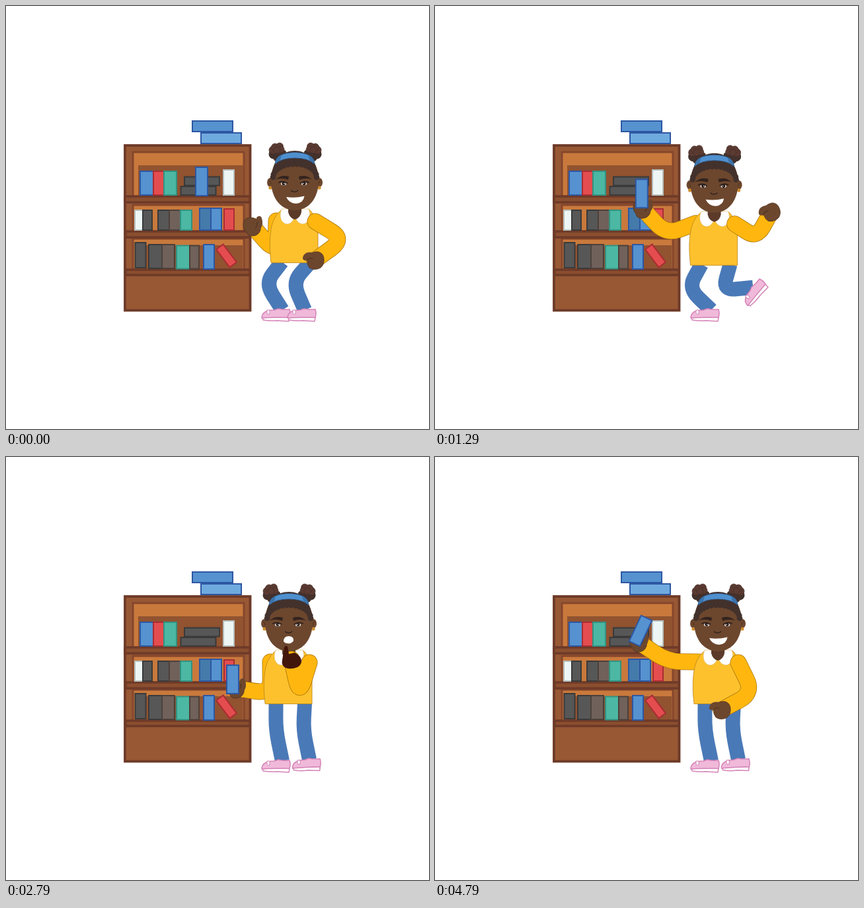
An HTML page that plays this animation: 640x640 px, repeating every 4.93 s.

```html
<!DOCTYPE html>
<html lang="en">
<head>
<meta charset="utf-8">
<title>Girl at the bookshelf</title>
<style>
  html, body { margin: 0; width: 100%; height: 100%; overflow: hidden; background: #fff; }
  svg { display: block; width: 100vw; height: 100vh; }
  .frame { fill: #985834; stroke: #6e3a28; stroke-width: 3.8; }
  .board { fill: #8b4f2f; stroke: #6e3a28; stroke-width: 3.5; }
  .niche { fill: #c9793c; stroke: #85462c; stroke-width: 3; }
  .back { fill: #915330; }
  .limb { fill: none; stroke-linejoin: round; }
  .leg { stroke: #4a79b7; stroke-width: 22; }
  .sleeve { stroke: #ffb70f; stroke-width: 23.4; stroke-linecap: round; }
  .seam { stroke: #a9740c; stroke-width: 25; stroke-linecap: round; }
  .skin { fill: #6c472e; }
  .hand { fill: #6c472e; stroke: #533420; stroke-width: .8; }
  .thumb { fill: none; stroke: #6c472e; stroke-width: 8; stroke-linecap: round; stroke-linejoin: round; }
  .crease { fill: none; stroke: #4a2e1d; stroke-width: 1; stroke-linecap: round; }
  .hair { fill: #43312c; }
  .curl { fill: #5a3a31; stroke: #49302a; stroke-width: .7; }
  .ink { fill: none; stroke: #2f211d; stroke-linecap: round; }
</style>
</head>
<body>
<svg viewBox="0 0 640 640" xmlns="http://www.w3.org/2000/svg">
  <defs>
    <g id="shoe" stroke="#d583b6" stroke-width="1.5" stroke-linejoin="round">
      <path fill="#fff" d="M-30 11L-29 15Q-18 17 -8 16L10 17L11 11Z"/>
      <path fill="#f0b9da" d="M-31 12C-31 3 -23 0 -12 0L-6 -2Q3 0 11 -1Q13 5 11 11Q-12 11 -31 12Z"/>
      <path fill="#fff" stroke-width="1" d="M-23 0h4v6q-3 1 -4 -1z"/>
    </g>
    <g id="bun">
      <g class="hair">
        <circle cx="396" cy="209" r="7.5"/><circle cx="401" cy="214" r="6"/>
        <circle cx="407" cy="212" r="7"/><circle cx="411" cy="207" r="4"/>
        <circle cx="410" cy="215" r="4"/>
      </g>
      <g class="curl">
        <circle cx="395" cy="203" r="6"/><circle cx="398" cy="198.500" r="5.500"/>
        <circle cx="405" cy="197.500" r="5.500"/><circle cx="407" cy="202" r="5"/>
        <circle cx="401" cy="203" r="5"/>
      </g>
    </g>
    <g id="side">
      <ellipse class="skin" cx="391" cy="252" rx="5" ry="7"/>
      <path class="crease" d="M389 249q3 1 3 6"/>
      <circle cx="391" cy="260" r="2.6" fill="#cf8f2f"/>
    </g>
    <g id="eye">
      <path d="M399 247.500Q407 239.500 419 243L418 248Q409 244.500 399 247.500Z" fill="#33231e"/>
      <ellipse cx="411" cy="254" rx="4" ry="2.2" fill="#fff"/>
      <circle cx="411" cy="253.500" r="2.6" fill="#241814"/>
      <path class="ink" stroke-width="1.8" d="M404 252Q410 249 416.500 253"/>
      <circle cx="412" cy="253.500" r=".8" fill="#fff"/>
    </g>
  </defs>

  <g id="shelf">
    <rect class="frame" x="180" y="211" width="189.500" height="249.500"/>
    <rect class="niche" x="192" y="221" width="168" height="68"/>
    <rect class="back" x="200" y="241" width="159" height="46"/>
    <rect class="niche" x="192" y="301" width="168" height="40"/>
    <rect class="niche" x="192" y="352" width="168" height="47"/>
    <rect class="back" x="200" y="362" width="158" height="36"/>
    <rect class="board" x="180" y="288" width="189" height="9"/>
    <rect class="board" x="181" y="341" width="188" height="9"/>
    <rect class="board" x="181" y="399" width="188" height="8"/>
  </g>
  <g id="books"></g>

  <path id="leftLeg" class="limb leg"/>
  <path id="rightLeg" class="limb leg"/>
  <use href="#shoe" transform="translate(418 460)"/>
  <g id="rightFoot"><use href="#shoe" x="5"/></g>

  <path id="leftSeam" class="limb seam"/>
  <path id="leftSleeve" class="limb sleeve"/>
  <g id="leftHand">
    <path class="hand" d="M-14 -4Q-13 -12 -4 -13Q5 -13 10 -6Q13 0 12 6Q9 15 -1 15Q-8 15 -9 9Q-15 4 -14 -4Z"/>
    <path class="thumb" d="M8 3Q13 -3 10 -11"/>
    <path class="crease" d="M4 3Q8 0 7 -6"/>
  </g>
  <g id="heldBook"></g>

  <g id="body">
    <path fill="#fdc12d" stroke="#b9821a" stroke-width=".8"
      d="M392 373.500Q389 350 391 330Q393 305 407 294L450 293Q461 302 463 330L463 373.500Z"/>
    <path fill="#fff" stroke="#d9b25d" stroke-width=".6"
      d="M408 292C403 304 408 315 417 315Q425 314 428 303Q431 314 440 315C450 314 453 302 449 292Z"/>
    <path fill="#5b3a29" d="M418 286h20v11q-2 9 -10 11q-8 -2 -10 -11z"/>
    <use href="#bun"/>
    <use href="#bun" transform="matrix(-1 0 0 1 857 0)"/>
    <use href="#side"/>
    <use href="#side" transform="matrix(-1 0 0 1 856 0)"/>
    <path class="skin" d="M392 249C392 220 408 208 428 208S464 220 464 249C464 277 448 294 428 294S392 277 392 249Z"/>
    <path class="hair" d="M394 243C394 216 410 204 428 204S462 216 462 243A34 19 0 0 0 394 243Z"/>
    <g id="fringe" class="hair"></g>
    <path fill="#4f90cf" stroke="#2f5580" stroke-width=".8"
      d="M398 224Q399 207 428 206.500Q457 207 458 224Q448 215 428 215T398 224Z"/>
    <path fill="#3b73ab" d="M398 224Q399 214 408 210L406 218ZM458 224Q457 214 448 210L450 218Z"/>
    <use href="#eye"/>
    <use href="#eye" transform="matrix(-1 0 0 1 853 0)"/>
    <path class="ink" stroke-width="1.4" d="M422.500 264q1.500 2 3 1.500q2 1.500 4 0q2 .5 3 -1.500"/>
    <path id="smile" fill="#fff" d="M415 274Q429 276 442.500 272.500Q441 283 430 284Q419 283.500 415 274Z"/>
    <path id="gasp" fill="#fff" d="M420 279Q420 271 428 271Q436 272 435 278Q432 283 426 282Q422 282 420 279Z"/>
  </g>

  <path id="rightSeam" class="limb seam"/>
  <path id="rightSleeve" class="limb sleeve"/>
  <g id="rightHand">
    <path class="hand" d="M-9 -8Q-3 -14 6 -13Q13 -11 14 -3Q15 6 9 11Q0 16 -8 11Q-12 6 -11 0Z"/>
    <path class="thumb" stroke-width="7" d="M-3 -8Q-12 -10 -14 -4"/>
    <path class="crease" d="M-13 1Q-9 -5 -3 -3"/>
  </g>
  <path id="darkHand" fill="#43160b"
    d="M-11 -18Q-9 -22 -6 -19L-4 -8L5 -10Q14 -5 15 2Q15 9 9 12Q-1 16 -9 13Q-16 9 -14 1Z"/>
</svg>

<script>
const FRAMES = 69, LOOP = 4930;
const $ = id => document.getElementById(id);

const colors = {
  blue: ['#5592cf', '#2d57a3'], sky: ['#6faade', '#2d57a3'], navy: ['#447bab', '#2d57a3'],
  red: ['#e44d4f', '#a92d33'], teal: ['#4cb8a4', '#329180'], dark: ['#575757', '#3a3a3a'],
  taupe: ['#70615a', '#4c403b'], white: ['#eef6f5', '#b5bfbe']
};
function book(color, x, y, w, h, turn = 0) {
  const [fill, stroke] = colors[color];
  return `<rect x="${x}" y="${y}" width="${w}" height="${h}" fill="${fill}" stroke="${stroke}"
    stroke-width="2" transform="rotate(${turn} ${x + w / 2} ${y + h / 2})"/>`;
}
// Upright books side by side, standing on one base line
function row(x, base, height, widths) {
  return Object.entries(widths).map(([color, w]) => {
    x += w;
    return book(color, x - w, base - height, w, height);
  }).join('');
}

$('books').innerHTML = [
  book('blue', 282, 174, 61, 16), book('sky', 295, 192, 61, 16),
  row(203, 286, 36, { blue: 20, red: 16, teal: 19 }), row(329, 286, 38, { white: 16 }),
  book('dark', 270, 258.5, 53, 13), book('dark', 264.5, 273, 53, 13),
  row(195, 339, 30, { white: 12, dark: 14 }), row(230, 339, 30, { dark: 17, taupe: 17, teal: 17 }),
  row(293, 339, 33, { navy: 17, blue: 16 }), row(330, 339, 32, { red: 15 }),
  row(195.5, 396, 38, { dark: 16 }), row(216, 397, 36, { dark: 20, taupe: 19 }),
  row(258, 397.5, 35, { teal: 20, taupe: 14 }), row(299, 398, 37, { blue: 16 }),
  book('red', 327, 361, 13, 34, -37)
].join('');
$('heldBook').innerHTML = book('blue', -9, -21.5, 18, 43);

$('fringe').innerHTML = Array.from({ length: 16 }, (_, i) => {
  const a = Math.PI * (1 + i / 15);
  return `<circle cx="${428 + 33 * Math.cos(a)}" cy="${244 + 20 * Math.sin(a)}" r="4.3"/>`;
}).join('');

// Hands and foot: x, y, angle. The grip places the book relative to the left hand.
const rest = {
  body: [9, 15], leftHand: [373, 333, 0], rightHand: [467, 385, 0], elbowSide: [1],
  rightFoot: [452, 460, 0], grip: [2, -15, 0]
};
const crouch = { ...rest, body: [9, 34], leftHand: [377, 373, -50], rightHand: [465, 383, 0], rightFoot: [455, 461, -4] };
const leap = {
  ...rest, body: [-9, 8], leftHand: [294, 280, 10], rightHand: [541, 245, -30], elbowSide: [-1.8],
  rightFoot: [492, 405, -80]
};
const land = {
  ...rest, body: [0, 35], leftHand: [344, 346, 0], rightHand: [459, 413, 0],
  rightFoot: [465, 457, -3], grip: [-6, -34, 0]
};
const stand = { ...land, body: [0, 7], leftHand: [347, 348, 0], rightHand: [444, 391, 0], rightFoot: [460, 458, -2], grip: [-6, -26, 0] };
const think = { ...stand, body: [0, 0], leftHand: [348, 350, 0], rightHand: [432, 306, 0], rightFoot: [459, 458, -2], grip: [-5, -13.5, 0] };
const approve = { ...think, rightHand: [432, 322, -18] };
const shelve = { ...think, leftHand: [308, 280, 0], rightHand: [433, 383, 0], grip: [3, -17, 25] };

const timeline = [
  [0, rest], [7, crouch], [16, leap], [21, land], [25, stand], [35, stand],
  [39, think], [51, think], [58, approve], [67, shelve], [FRAMES, shelve]
];

const mix = (a, b, u) => a.map((v, i) => v + (b[i] - v) * u);

function poseAt(frame) {
  const i = timeline.findIndex(([end]) => end > frame);
  const [start, a] = timeline[i - 1], [end, b] = timeline[i];
  const pose = {};
  for (const part in a) pose[part] = mix(a[part], b[part], (frame - start) / (end - start));
  return pose;
}

// Two bones of given lengths from start to end, drawn with a rounded joint
function limb([x, y], [endX, endY], upper, lower, side) {
  const dx = endX - x, dy = endY - y, d = Math.hypot(dx, dy);
  const along = (upper ** 2 - lower ** 2 + d * d) / (2 * d);
  const out = side * Math.sqrt(Math.max(0, upper ** 2 - along ** 2));
  const joint = [x + (dx * along + dy * out) / d, y + (dy * along - dx * out) / d];
  const start = [x, y], end = [endX, endY];
  return `M${start}L${mix(start, joint, .56)}Q${joint} ${mix(end, joint, .56)}L${end}`;
}

function withinReach([x, y], [endX, endY, turn], reach) {
  const u = Math.min(1, reach / Math.hypot(endX - x, endY - y));
  return [x + (endX - x) * u, y + (endY - y) * u, turn];
}

const place = (id, [x, y, turn = 0]) =>
  $(id).setAttribute('transform', `translate(${x} ${y}) rotate(${turn})`);
const trace = (id, d) => $(id).setAttribute('d', d);
const show = (id, on) => $(id).setAttribute('visibility', on ? 'visible' : 'hidden');

function draw(frame) {
  const pose = poseAt(frame);
  const at = (x, y) => [x + pose.body[0], y + pose.body[1]];
  const shoulder = at(459, 311);
  pose.rightHand = withinReach(shoulder, pose.rightHand, 97);

  for (const id of ['body', 'leftHand', 'rightHand', 'rightFoot']) place(id, pose[id]);
  place('darkHand', pose.rightHand);
  const [gripX, gripY, tilt] = pose.grip;
  place('heldBook', frame < 16 ? [296, 265.5] : [pose.leftHand[0] + gripX, pose.leftHand[1] + gripY, tilt]);

  trace('leftLeg', limb(at(408.5, 372), [418, 460], 41, 48, -1));
  trace('rightLeg', limb(at(452, 372), pose.rightFoot, 41, 46, -1));
  const left = limb(at(400, 310), pose.leftHand, 48, 53, 1);
  const right = limb(shoulder, pose.rightHand, 51, 55, pose.elbowSide[0]);
  for (const layer of ['Seam', 'Sleeve']) {
    trace('left' + layer, left);
    trace('right' + layer, right);
  }

  const thinking = frame >= 37 && frame <= 60;
  show('darkHand', thinking);
  show('rightHand', !thinking);
  const gasping = frame >= 19 && frame < 54;
  show('gasp', gasping);
  show('smile', !gasping);
}

const begin = performance.now();
function tick() {
  const t = (performance.now() - begin) % LOOP;
  draw(Math.floor(t / LOOP * FRAMES + 0.1) % FRAMES);
  requestAnimationFrame(tick);
}
tick();
</script>
</body>
</html>
```
